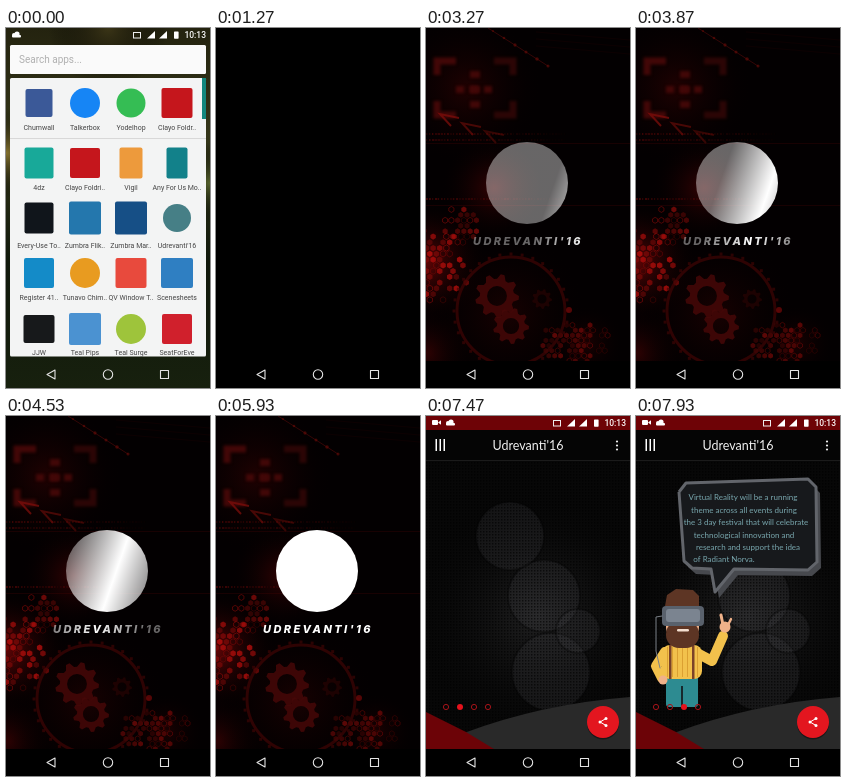
Recreate the animation shown at these times as an HTML page with a canvas. Size 204 by 360 pixels, loop 8000 ms.

```html
<!DOCTYPE html>
<html lang="en">
<head>
<meta charset="utf-8">
<title>App launch</title>
<style>
  html, body { margin: 0; width: 100%; height: 100%; overflow: hidden; background: #000; }
  canvas { display: block; width: 204px; height: 360px; }
</style>
</head>
<body>
<canvas id="stage"></canvas>
<script>
const W = 204, H = 360, LOOP = 8000, TAU = Math.PI * 2;
const scale = window.devicePixelRatio || 1;
const clamp = v => Math.max(0, Math.min(1, v));
const progress = (t, a, b) => clamp((t - a) / (b - a));
const easeOut = p => 1 - (1 - p) ** 3;
const easeInOut = p => p * p * (3 - 2 * p);

function prepare(canvas) {
  canvas.width = W * scale;
  canvas.height = H * scale;
  const c = canvas.getContext('2d');
  c.scale(scale, scale);
  return c;
}

function layer(draw) {
  const canvas = document.createElement('canvas');
  draw(prepare(canvas));
  return canvas;
}

function randomizer(seed) {
  return () => (seed = (seed * 16807) % 2147483647) / 2147483647;
}

function rect(c, x, y, w, h, color, r = 0) {
  c.fillStyle = color;
  c.beginPath();
  c.roundRect(x, y, w, h, r);
  c.fill();
}

function disc(c, x, y, r, color) {
  c.fillStyle = color;
  c.beginPath();
  c.arc(x, y, r, 0, TAU);
  c.fill();
}

function ring(c, x, y, r, color, width = 1) {
  c.strokeStyle = color;
  c.lineWidth = width;
  c.beginPath();
  c.arc(x, y, r, 0, TAU);
  c.stroke();
}

function trace(c, points, close) {
  c.beginPath();
  points.forEach(([x, y]) => c.lineTo(x, y));
  if (close) c.closePath();
}

function poly(c, points, color) {
  trace(c, points, true);
  c.fillStyle = color;
  c.fill();
}

function line(c, points, color, width = 1) {
  trace(c, points);
  c.strokeStyle = color;
  c.lineWidth = width;
  c.stroke();
}

function text(c, str, x, y, font, color, align = 'center') {
  c.font = font;
  c.fillStyle = color;
  c.textAlign = align;
  c.textBaseline = 'middle';
  c.fillText(str, x, y);
}

function glow(c, x, y, r, color) {
  const g = c.createRadialGradient(x, y, 0, x, y, r);
  g.addColorStop(0, color);
  g.addColorStop(1, 'transparent');
  c.fillStyle = g;
  c.fillRect(x - r, y - r, r * 2, r * 2);
}

function navBar(c, opaque = true) {
  if (opaque) rect(c, 0, 333, W, 27, '#000');
  c.lineJoin = 'round';
  c.strokeStyle = '#e4e4e4';
  c.lineWidth = 1.1;
  trace(c, [[41, 346.5], [49, 342], [49, 351]], true);
  c.stroke();
  ring(c, 102, 346.5, 4.7, '#e4e4e4', 1.1);
  c.strokeRect(154.5, 342.5, 8, 8);
}

function statusBar(c, camera) {
  if (camera) {
    rect(c, 6, 4, 6, 5, '#fff', 1);
    poly(c, [[12, 6.5], [15, 4.3], [15, 8.8]], '#fff');
  }
  const x = camera ? 24 : 10;
  disc(c, x - 2, 7, 2, '#fff');
  disc(c, x + 1, 6, 2.6, '#fff');
  rect(c, x - 4, 7, 9, 2.4, '#fff', 1);
  c.strokeStyle = '#eee';
  c.lineWidth = 1;
  c.strokeRect(127.5, 4.5, 7, 5.5);
  poly(c, [[141, 10.5], [149, 10.5], [149, 3]], '#fff');
  poly(c, [[153, 10.5], [161, 10.5], [161, 3]], '#fff');
  rect(c, 168, 3.4, 4.6, 7.4, '#fff', .7);
  text(c, '10:13', 200, 7.5, '500 8.5px Roboto, sans-serif', '#fff', 'right');
}

// Label, colour, icon width, icon height, round?
const apps = [
  ['Chumwall', '#3b5998', 27, 28], ['Talkerbox', '#1685f5', 30, 30, 1],
  ['Yodelhop', '#35bd54', 29, 29, 1], ['Clayo Foldr..', '#c5161c', 31, 30],
  ['4dz', '#18a999', 29, 31], ['Clayo Foldri..', '#c5161c', 30, 30],
  ['Vigil', '#ed9a3c', 23, 31], ['Any For Us Mo..', '#12818a', 21, 31],
  ['Every-Use To..', '#10151b', 29, 31], ['Zumbra Flik..', '#2477ad', 32, 33],
  ['Zumbra Mar..', '#164f86', 32, 33], ["Udrevanti'16", '#467f86', 28, 28, 1],
  ['Register 41..', '#148bc8', 30, 30], ['Tunavo Chim..', '#e89b20', 30, 30, 1],
  ['QV Window T..', '#e84a3d', 31, 30], ['Scenesheets', '#2f7fc2', 32, 30],
  ['JJW', '#17191b', 31, 28], ['Teal Pips', '#4b92d1', 32, 32],
  ['Teal Surge', '#9ec43b', 30, 30, 1], ['SeatForEve', '#d0202c', 30, 30]
];
const iconRows = [75, 135, 190, 245, 301];
const labelRows = [100, 160, 218, 270, 325];

const drawer = layer(c => {
  const g = c.createLinearGradient(0, 0, 0, H);
  g.addColorStop(0, '#24230f');
  g.addColorStop(.3, '#343619');
  g.addColorStop(.65, '#10180b');
  g.addColorStop(1, '#17200e');
  c.fillStyle = g;
  c.fillRect(0, 0, W, H);
  glow(c, 0, 125, 45, '#85722e');
  glow(c, 204, 155, 40, '#55612c');
  glow(c, 102, 0, 60, '#3b3517');
  statusBar(c, false);
  rect(c, 4, 17, 196, 29, '#fafafa', 1.5);
  text(c, 'Search apps...', 13, 32, '10px Roboto, sans-serif', '#b0b0b0', 'left');
  rect(c, 4, 50, 196, 278.5, '#f3f4f4', 1.5);
  rect(c, 4, 110, 196, 1, '#d8d8d8');
  rect(c, 196, 50, 4, 41, '#12877d');
  c.save();
  c.beginPath();
  c.rect(4, 50, 196, 278.5);
  c.clip();
  apps.forEach(([label, color, w, h, round], i) => {
    const x = 33 + (i % 4) * 46, row = Math.floor(i / 4), y = iconRows[row];
    if (round) disc(c, x, y, w / 2, color);
    else rect(c, x - w / 2, y - h / 2, w, h, color, 2);
    text(c, label, x, labelRows[row], '7px Roboto, sans-serif', '#444');
  });
  c.restore();
  navBar(c, false);
});

function gear(c, x, y, r, color) {
  c.beginPath();
  for (let i = 0; i < 36; i++) {
    const a = i * TAU / 36, d = i % 4 < 2 ? r : r * .78;
    c.lineTo(x + d * Math.cos(a), y + d * Math.sin(a));
  }
  c.closePath();
  c.moveTo(x + r * .45, y);
  c.arc(x, y, r * .45, 0, TAU);
  c.fillStyle = color;
  c.fill('evenodd');
}

function hexes(c, cx, cy, rx, ry, size, strength, seed) {
  const random = randomizer(seed);
  for (let y = cy - ry, row = 0; y < cy + ry; y += size * 1.6, row++) {
    for (let x = cx - rx + (row % 2) * size * .92; x < cx + rx; x += size * 1.84) {
      const d = Math.hypot((x - cx) / rx, (y - cy) / ry);
      if (random() < d * .6 || d > 1) continue;
      const points = Array.from({ length: 6 }, (_, i) => {
        const a = (i + .5) * TAU / 6;
        return [x + size * .87 * Math.cos(a), y + size * .87 * Math.sin(a)];
      });
      const color = `rgba(180,14,12,${strength * (.3 + random() * .6)})`;
      if (random() < .55) poly(c, points, color);
      else line(c, [...points, points[0]], color, .7);
    }
  }
}

const backdrop = layer(c => {
  const random = randomizer(71);
  rect(c, 0, 0, W, H, '#030001');
  glow(c, 40, 60, 80, 'rgba(50,2,2,.6)');
  glow(c, 68, 160, 55, 'rgba(85,4,5,.6)');
  glow(c, 0, 235, 62, 'rgba(125,6,6,.75)');
  glow(c, 0, 325, 50, 'rgba(75,3,3,.6)');
  glow(c, 80, 285, 85, 'rgba(38,2,2,.6)');
  glow(c, 160, 315, 40, 'rgba(50,2,2,.5)');

  c.filter = `blur(${1.6 * scale}px)`;
  const dim = '#420707';
  line(c, [[30, 33], [11, 33], [11, 47]], dim, 7);
  line(c, [[11, 73], [11, 87], [30, 87]], dim, 7);
  line(c, [[68, 33], [87, 33], [87, 47]], '#2c0505', 7);
  line(c, [[87, 73], [87, 87], [68, 87]], '#2c0505', 7);
  for (let y = 43; y < 80; y += 15) rect(c, 44, y, 10, 7, dim);
  for (let x = 30; x < 70; x += 14) rect(c, x, 58, 8, 7, dim);
  c.filter = 'none';

  line(c, [[62, 0], [122, 38]], 'rgba(100,12,10,.5)', 1);
  for (let i = 0; i < 6; i++) {
    disc(c, 67 + i * 11, 3 + i * 7, 1 + random(), 'rgba(115,12,10,.55)');
  }
  [[14, 86, .75], [36, 95, .55], [59, 103, .4]].forEach(([x, y, a]) =>
    line(c, [[x + 19, y + 4], [x, y], [x + 11, y + 12]], `rgba(125,14,11,${a})`, 2));
  for (const y of [105, 111, 170]) {
    for (let x = 0; x < 140; x += 3) {
      rect(c, x, y, 1 + random() * 1.5, 2, `rgba(130,10,10,${(1 - x / 150) * (.15 + random() * .35)})`);
    }
  }
  rect(c, 0, 115, W, .7, 'rgba(75,5,5,.4)');
  rect(c, 0, 177, W, .7, 'rgba(75,5,5,.4)');
  for (let y = 4; y < 20; y += 7) line(c, [[110, y], [204, y + 8]], 'rgba(40,3,3,.35)', .8);

  hexes(c, 10, 235, 36, 38, 3.6, 1, 913);
  hexes(c, 34, 196, 18, 20, 3.4, .7, 415);
  hexes(c, 152, 314, 38, 22, 3.2, .55, 227);
  ring(c, 85, 283, 54, 'rgba(65,5,5,.7)', 3);
  for (let i = 0; i < 32; i++) {
    const a = i * TAU / 32;
    rect(c, 85 + 57 * Math.cos(a) - 1.5, 283 + 57 * Math.sin(a) - 1.5, 3, 3, 'rgba(60,5,5,.7)');
  }
  gear(c, 71, 268, 22, 'rgba(70,8,8,.85)');
  gear(c, 85, 298, 18, 'rgba(70,8,8,.85)');
  gear(c, 116, 271, 10, 'rgba(35,3,3,.8)');
  disc(c, 143, 282, 3, 'rgba(105,8,7,.8)');
  navBar(c);
});

const SWEEP = 735;

function brand(c, t) {
  const phase = (t - 4530 + SWEEP * 5.5) % SWEEP - SWEEP / 2;
  const center = 110 + phase * .33;
  const rest = .4 + .6 * easeInOut(progress(t, 5350, 5750));
  const g = c.createLinearGradient(center - 46, 139, center + 46, 171);
  g.addColorStop(0, `rgba(255,255,255,${rest})`);
  g.addColorStop(.5, '#fff');
  g.addColorStop(1, `rgba(255,255,255,${rest})`);
  disc(c, 101, 155, 41, g);
  c.letterSpacing = '2.4px';
  text(c, "UDREVANTI'16", 47, 214, 'italic 800 11px Inter, sans-serif', g, 'left');
  c.letterSpacing = '0px';
}

const pageBackdrop = layer(c => {
  rect(c, 0, 0, W, H, '#070707');
  glow(c, 112, 200, 135, 'rgba(52,52,53,.6)');
  [[118, 180, 36], [125, 256, 39], [84, 120, 34], [152, 215, 22]].forEach(([x, y, r]) => {
    disc(c, x, y, r, 'rgba(75,75,77,.22)');
    ring(c, x, y, r, 'rgba(0,0,0,.3)', 2);
  });
  for (let y = 43; y < 333; y += 3) {
    for (let x = 0; x < W; x += 3) rect(c, x, y, 1.4, 1.4, 'rgba(0,0,0,.6)');
  }
});

const pageFrame = layer(c => {
  c.beginPath();
  c.moveTo(38, 317);
  c.quadraticCurveTo(115, 288, W, 281);
  c.lineTo(W, 333);
  c.lineTo(66, 333);
  c.fillStyle = '#292929';
  c.fill();
  poly(c, [[0, 296], [40, 316], [68, 333], [0, 333]], '#6c0307');
  rect(c, 0, 0, W, 14, '#6e0306');
  rect(c, 0, 14, W, 30, '#050505');
  rect(c, 0, 44, W, 1, '#1b1b1b');
  statusBar(c, true);
  for (let x = 9.5; x < 19; x += 4) rect(c, x, 23, 1.5, 12, '#fff');
  for (let y = 25.5; y < 35; y += 4) disc(c, 191, y, 1.1, '#eee');
  text(c, "Udrevanti'16", 102, 30.5, '12.5px Lato, sans-serif', '#f2f2f2');
  disc(c, 177, 307.5, 16, 'rgba(0,0,0,.4)');
  disc(c, 177, 306, 16, '#e3161f');
  const share = [[180, 302.5], [174, 306], [180, 309.5]];
  line(c, share, '#fff', 1);
  share.forEach(([x, y]) => disc(c, x, y, 1.5, '#fff'));
  navBar(c);
});

const datePage = layer(c => {
  disc(c, 96, 131, 46, '#3b91a3');
  rect(c, 14, 196, 158, 26, 'rgba(100,106,112,.75)', 2);
  [..."UDREVANTI'16"].forEach((letter, i) => {
    const x = 20 + i * 12.2, light = i === 2 || (i > 4 && i < 9);
    rect(c, x, 201, 11.4, 16, light ? '#c4ccd0' : '#173640');
    text(c, letter, x + 5.7, 209.5, 'bold 12.5px "Noto Serif", serif', light ? '#20282c' : '#3f9eb0');
  });
  text(c, '2nd-4th April', 91, 248.5, 'bold 16.5px Lato, sans-serif', '#2b93a2');
});

const message = [
  ['Virtual Reality will be a running', 107], ['theme across all events during', 108],
  ['the 3 day festival that will celebrate', 110], ['technological innovation and', 108],
  ['research and support the idea', 112], ['of Radiant Norva.', 88]
];

function bubble(c) {
  const outline = [[43, 76], [50, 67], [172, 63], [180, 71], [181, 146], [172, 154],
    [98, 153], [79, 176], [75, 153], [56, 152], [48, 145]];
  c.lineJoin = 'round';
  poly(c, outline.map(([x, y]) => [x + 4, y + 6]), '#47494e');
  poly(c, outline, '#17191c');
  line(c, [...outline, outline[0]], '#62656b', 3);
  message.forEach(([str, x], i) =>
    text(c, str, x, 82 + i * 12.4, '8px Lato, sans-serif', '#79a7ae'));
}

function person(c) {
  const skin = '#efb189', hair = '#5d3524', shirt = '#f2c14c';
  c.lineCap = 'round';
  c.lineJoin = 'round';
  rect(c, 30, 258, 32, 33, '#2d8b91', 3);
  rect(c, 45, 270, 2, 21, '#17292d');
  line(c, [[29, 236], [20, 250], [26, 262]], shirt, 10);
  line(c, [[61, 237], [76, 245], [87, 220]], shirt, 10);
  rect(c, 26, 229, 40, 34, shirt, 8);
  for (let x = 31; x < 64; x += 5) rect(c, x, 231, 1, 30, '#dba032');
  rect(c, 33, 229, 2.5, 34, '#7b4229');
  rect(c, 56, 229, 2.5, 34, '#7b4229');
  disc(c, 27, 264, 4.5, skin);
  disc(c, 89, 211, 5.5, skin);
  line(c, [[87, 209], [85, 199]], skin, 3);
  line(c, [[92, 209], [95, 203]], skin, 2.5);
  rect(c, 30, 178, 33, 46, skin, 13);
  rect(c, 30, 205, 33, 27, hair, 13);
  poly(c, [[29, 190], [31, 179], [40, 173], [57, 174], [63, 180], [63, 190]], hair);
  rect(c, 41, 213, 12, 2.5, '#f4dfd0', 1.2);
  rect(c, 26, 190, 42, 20, '#59616c', 4);
  rect(c, 30, 193, 34, 13, '#7b8490', 3);
  line(c, [[26, 200], [20, 201], [20, 235], [24, 252]], '#7a8087', 1);
}

const messagePage = layer(c => {
  bubble(c);
  person(c);
});

const stage = document.getElementById('stage');
const ctx = prepare(stage);

function paint(image, x = 0) {
  ctx.drawImage(image, x, 0, W, H);
}

function drawLaunch(t) {
  paint(drawer);
  if (t < 730) return;
  const p = easeOut(progress(t, 730, 1130));
  ctx.globalAlpha = progress(t, 730, 830);
  rect(ctx, 157 * (1 - p), 176 * (1 - p), 28 + (W - 28) * p, 28 + (H - 28) * p, '#000');
  ctx.globalAlpha = 1;
  navBar(ctx, false);
}

function drawSplash(t) {
  rect(ctx, 0, 0, W, H, '#000');
  ctx.globalAlpha = easeOut(progress(t, 1930, 2400));
  paint(backdrop);
  brand(ctx, t);
  ctx.globalAlpha = 1;
  navBar(ctx);
}

// Two swipes carry the pager from the first page to the third.
function pagerPosition(t) {
  return easeInOut(progress(t, 7070, 7430)) + easeInOut(progress(t, 7500, 7860));
}

function drawHome(t) {
  const enter = easeOut(progress(t, 6400, 6800));
  const position = pagerPosition(t);
  ctx.save();
  ctx.globalAlpha = enter;
  ctx.translate(0, 28 * (1 - enter));
  paint(pageBackdrop);
  paint(datePage, -W * position);
  paint(messagePage, W * (2 - position));
  paint(pageFrame);
  for (let i = 0; i < 4; i++) {
    const x = 20 + i * 14;
    if (i === Math.round(position)) disc(ctx, x, 291, 3, '#e5121c');
    else ring(ctx, x, 291, 2.6, '#a61319', 1);
  }
  ctx.restore();
  navBar(ctx);
}

function render(now) {
  const t = now % LOOP;
  ctx.clearRect(0, 0, W, H);
  if (t < 1270) drawLaunch(t);
  else if (t < 6800) drawSplash(t);
  if (t >= 6400) drawHome(t);
}

const start = performance.now();
function tick() {
  render(performance.now() - start);
  requestAnimationFrame(tick);
}
tick();
</script>
</body>
</html>
```
